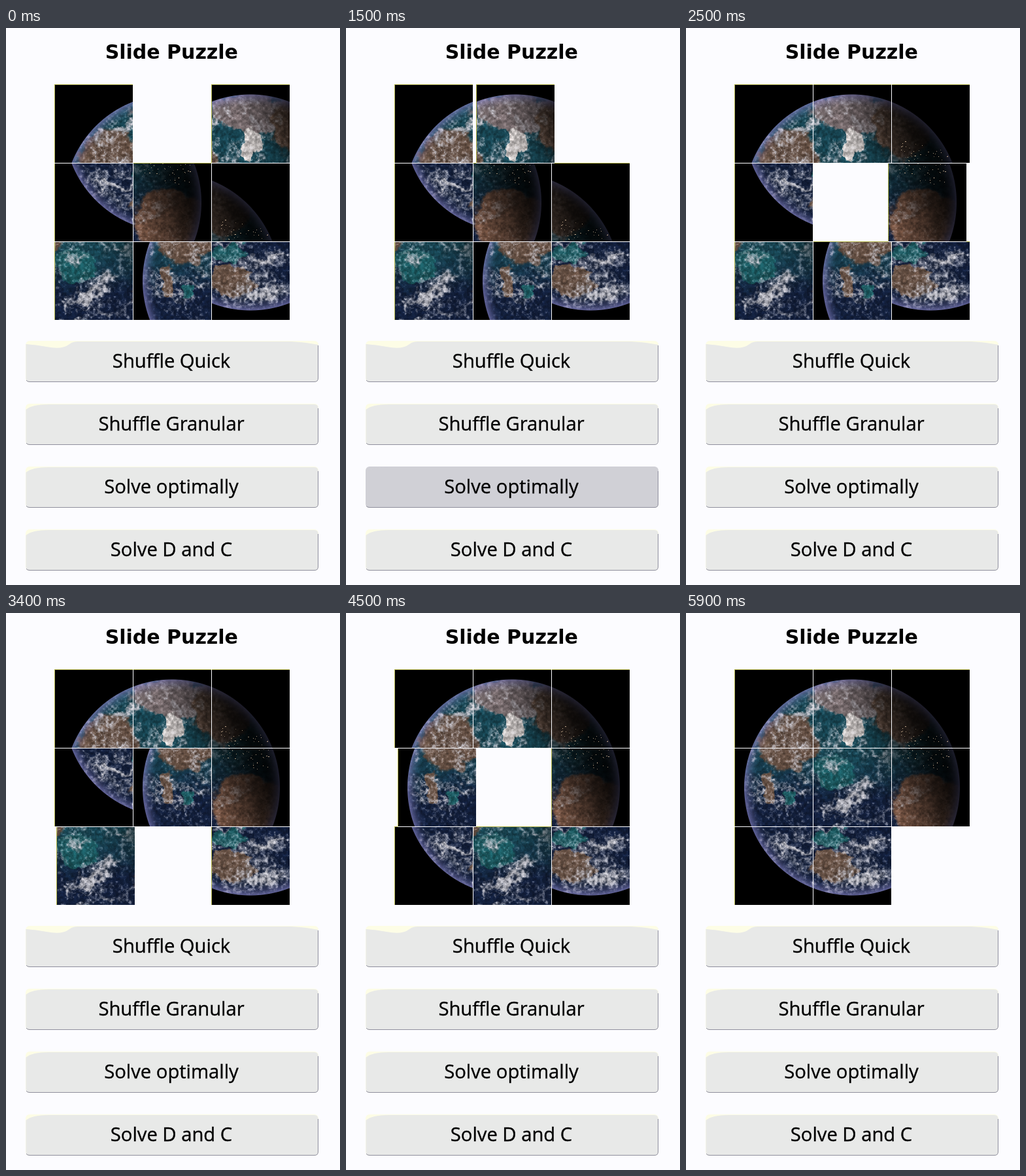
Write an HTML page with a canvas that moves like this. It is 511 px wide and 851 px high and loops after 6200 ms.

```html
<!DOCTYPE html>
<html lang="en">
<head>
<meta charset="utf-8">
<title>Slide Puzzle</title>
<style>
  html, body { margin: 0; width: 100%; height: 100%; overflow: hidden; background: #fcfcff; }
  svg, canvas { position: absolute; left: 0; top: 0; }
  text { text-anchor: middle; font: 29.2px "Open Sans", "Noto Sans", sans-serif; stroke: #000; stroke-width: .35px; }
  text.title { font: bold 30px "DejaVu Sans", sans-serif; stroke: none; }
  .base { fill: #fdfde6; }
  .face { fill: #e8e9e8; }
  .hover .base, .hover .face { fill: #d0d0d6; }
  .edge { fill: none; stroke: #8f8f9d; }
</style>
</head>
<body>
<svg id="ui" width="511" height="851"><text class="title" x="253.3" y="47">Slide Puzzle</text></svg>
<canvas id="board" width="511" height="851"></canvas>
<script>
const LOOP = 6200, STEP = 100, SLIDE = 300;
const TILE = 120, SIZE = 360, LEFT = 74, TOP = 86;
const HOVER = [200, 1900];

// Slots the gap passes through; tile 8 is the gap itself
const PATH = [1, 2, 5, 4, 7, 6, 3, 4, 7, 8];
// One move every half second; the fifth sets off late
const moveStart = k => 777 + 500 * k + (k === 5 ? 110 : 0);

// ---- buttons ----
const ui = document.getElementById('ui');
const buttons = ['Shuffle Quick', 'Shuffle Granular', 'Solve optimally', 'Solve D and C'].map((label, i) => {
  const top = i ? 'M30.5 8Q40 0 65 0H472Q477.5 0 477.5 6' : 'M30.5 4Q46 5 62 8Q86 13 97 4Q102 0 110 0H436Q458 1 477.5 5';
  const g = document.createElementNS('http://www.w3.org/2000/svg', 'g');
  g.setAttribute('transform', `translate(0 ${479 + 96 * i})`);
  g.innerHTML = `<rect class="base" x="30" y="-1" width="448" height="63" rx="6"/>
    <path class="face" d="${top}V56Q477.5 61.5 472 61.5H36Q30.5 61.5 30.5 56Z"/>
    <path class="edge" d="M477.5 6V56Q477.5 61.5 472 61.5H36Q32 61.5 31 59"/>
    <text x="253" y="40">${label}</text>`;
  return ui.appendChild(g);
});

// ---- globe ----
const clamp = v => Math.max(0, Math.min(1, v));
const smooth = (a, b, v) => { const k = clamp((v - a) / (b - a)); return k * k * (3 - 2 * k); };
const mix = (a, b, k) => a + (b - a) * k;
const blend = (a, b, k) => a.map((v, i) => mix(v, b[i], k));

function hash(x, y) {
  let h = Math.imul(x, 374761393) + Math.imul(y, 668265263);
  h = Math.imul(h ^ (h >>> 13), 1274126177);
  return ((h ^ (h >>> 16)) >>> 0) / 4294967296;
}

function noise(x, y) {
  const i = Math.floor(x), j = Math.floor(y);
  const u = smooth(0, 1, x - i), v = smooth(0, 1, y - j);
  return mix(mix(hash(i, j), hash(i + 1, j), u), mix(hash(i, j + 1), hash(i + 1, j + 1), u), v);
}

function fbm(x, y) {
  let sum = 0;
  for (let o = 0, a = 0.5; o < 4; o++, a /= 2, x = x * 2 + 17, y = y * 2 + 31) sum += a * noise(x, y);
  return sum / 0.9375;
}

const TEAL = [30, 98, 106], NAVY = [20, 34, 66], SOIL = [112, 88, 74], SAND = [140, 100, 80];
const ICE = [138, 124, 126], SNOW = [222, 216, 214], CLOUD = [186, 186, 194], HAZE = [122, 120, 182];

// Regions and cloud banks: centre x, y, radius x, y
const REGIONS = [
  [TEAL, 152, 158, 30, 26], [TEAL, 150, 258, 30, 14], [TEAL, 84, 198, 10, 10],
  [SOIL, 82, 112, 46, 42], [SOIL, 52, 180, 10, 26], [SOIL, 150, 300, 34, 24],
  [ICE, 180, 42, 62, 28], [SOIL, 256, 66, 42, 48], [SAND, 296, 206, 54, 46],
  [SNOW, 184, 84, 15, 20], [SNOW, 178, 104, 8, 16]
];
const BANKS = [
  [92, 168, 26, 16], [95, 278, 42, 34], [196, 266, 38, 11], [195, 322, 46, 12],
  [176, 204, 24, 16], [203, 176, 24, 16], [228, 142, 18, 24], [70, 84, 46, 40]
];
const bump = (x, y, [cx, cy, rx, ry]) => Math.exp(-(((x - cx) / rx) ** 2) - ((y - cy) / ry) ** 2);

function earthColor(x, y, r) {
  const wx = (fbm(x / 14, y / 14) - 0.5) * 34, wy = (fbm(x / 14 + 90, y / 14) - 0.5) * 34;
  const grain = fbm(x / 4 + 40, y / 4);
  const streak = fbm(Math.atan2(x - 140, y - 14) * 6 + wx / 26, Math.hypot(x - 140, y - 14) / 12 + wy / 10);
  const night = smooth(20, 165, x - 180 - (y - 180) * 0.45);

  let color = blend(TEAL, NAVY, 0.3 + 0.7 * smooth(120, 210, y + wy));
  for (const [tint, ...spot] of REGIONS) {
    color = blend(color, tint, smooth(0.3, 0.42, bump(x + wx * 0.7, y + wy * 0.7, spot)));
  }
  const bank = Math.min(1, BANKS.reduce((sum, b) => sum + bump(x + wx, y + wy, b), 0));
  const white = smooth(0.46, 0.84, streak * 0.6 + grain * 0.4 + bank * 0.15) * (1 - night * 0.8);
  const light = (1 - night * 0.9) * (0.5 + grain * 0.8);
  const rim = clamp((r - 145) / 20) ** 2 * 0.75;
  color = blend(color, CLOUD, white).map(v => v * light);
  return blend(color, HAZE.map(v => v * (1 - night * 0.7)), rim);
}

function drawEarth() {
  const canvas = document.createElement('canvas');
  canvas.width = canvas.height = SIZE;
  const c = canvas.getContext('2d'), img = c.createImageData(SIZE, SIZE);
  for (let y = 0, i = 0; y < SIZE; y++) for (let x = 0; x < SIZE; x++, i += 4) {
    const r = Math.hypot(x - 179.5, y - 180), disc = clamp(165.5 - r);
    const rgb = disc ? earthColor(x, y, r) : [0, 0, 0];
    img.data.set([...rgb.map(v => v * disc), 255], i);
  }
  c.putImageData(img, 0, 0);
  // city lights on the night side
  for (let n = 0; n < 85; n++) {
    const x = 252 + hash(n, 5) * 78, y = 92 + hash(n, 9) * 58 + (x - 290) * 0.2;
    c.fillStyle = `rgba(235,205,170,${0.25 + hash(n, 3) * 0.55})`;
    c.fillRect(Math.round(x), Math.round(y), 1 + (n % 5 === 0), 1);
  }
  return canvas;
}

// ---- motion ----
const bezier = (u, a, b) => 3 * u * (1 - u) * (1 - u) * a + 3 * u * u * (1 - u) * b + u * u * u;

function ease(k) {
  let lo = 0, hi = 1;
  if (k >= 1) return 1;
  for (let n = 0; n < 20; n++) {
    const mid = (lo + hi) / 2;
    if (bezier(mid, 0.25, 0.25) < k) lo = mid; else hi = mid;
  }
  return bezier(lo, 0.1, 1);
}

const place = slot => [LEFT + slot % 3 * TILE, TOP + Math.floor(slot / 3) * TILE];

// Slot of each tile at the start: the solved board with every move undone
const START = [0, 1, 2, 3, 4, 5, 6, 7, 8];
for (let k = PATH.length - 1; k > 0; k--) {
  START[START.indexOf(PATH[k - 1])] = PATH[k];
  START[8] = PATH[k - 1];
}

function layout(t) {
  const slots = [...START], spots = slots.map(place);
  for (let k = 1; k < PATH.length && t >= moveStart(k); k++) {
    const tile = slots.indexOf(PATH[k]), from = place(PATH[k]), to = place(PATH[k - 1]);
    spots[tile] = blend(from, to, ease((t - moveStart(k)) / SLIDE)).map(Math.round);
    slots[tile] = PATH[k - 1];
    slots[8] = PATH[k];
  }
  return spots.slice(0, 8);
}

const earth = drawEarth();
const ctx = document.getElementById('board').getContext('2d');

function draw(t) {
  const spots = layout(t), inner = TILE - 1;
  ctx.clearRect(0, 0, 511, 851);
  spots.forEach(([x, y], tile) => {
    ctx.fillStyle = '#b4b448';
    ctx.fillRect(x, y, TILE, TILE);
    ctx.drawImage(earth, tile % 3 * TILE + 1, Math.floor(tile / 3) * TILE + 1, inner, inner, x + 1, y + 1, inner, inner);
  });
  // white seams between neighbours
  ctx.fillStyle = '#fcfcff';
  for (const [x, y] of spots) {
    ctx.fillRect(x + TILE, y, 1, TILE);
    ctx.fillRect(x, y + TILE, TILE, 1);
  }
  buttons[2].classList.toggle('hover', t >= HOVER[0] && t < HOVER[1]);
}

const begin = performance.now();
function tick() {
  const t = (performance.now() - begin) % LOOP;
  draw(Math.floor(t / STEP) * STEP);
  requestAnimationFrame(tick);
}
tick();
</script>
</body>
</html>
```
